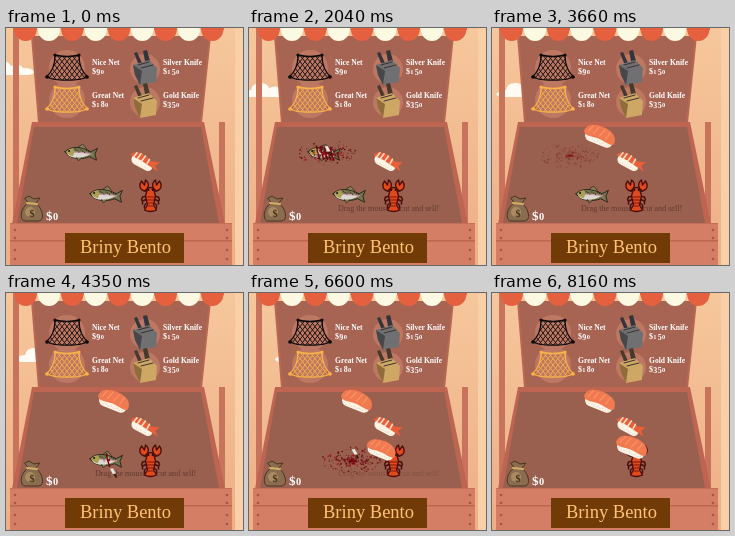
Recreate the animation shown at these times as an HTML page with a canvas. Size 237 by 237 pixels, loop 8220 ms.

```html
<!DOCTYPE html>
<html lang="en">
<head>
<meta charset="utf-8">
<title>Sushi stall</title>
<style>
html, body { margin: 0; width: 100%; height: 100%; overflow: hidden; background: #f3bd94; }
canvas { display: block; width: 237px; height: 237px; }
</style>
</head>
<body>
<canvas></canvas>
<script>
const LOOP = 8220, SIZE = 237;
const SERIF = '"Liberation Serif", serif';
const canvas = document.querySelector('canvas');
const g = canvas.getContext('2d');
const ratio = window.devicePixelRatio || 1;
canvas.width = canvas.height = SIZE * ratio;

const clamp = v => Math.max(0, Math.min(1, v));
const ramp = (t, a, b) => clamp((t - a) / (b - a));
const easeOut = p => 1 - (1 - p) ** 3;
const mix = (a, b, p) => a + (b - a) * p;

function seeded(seed) {
  return () => (seed = (seed * 16807) % 2147483647) / 2147483647;
}

function rect(color, x, y, w, h) {
  g.fillStyle = color;
  g.fillRect(x, y, w, h);
}

function poly(color, ...p) {
  g.fillStyle = color;
  g.beginPath();
  for (let i = 0; i < p.length; i += 2) g.lineTo(p[i], p[i + 1]);
  g.closePath();
  g.fill();
}

function oval(color, x, y, rx, ry = rx) {
  g.fillStyle = color;
  g.beginPath();
  g.ellipse(x, y, rx, ry, 0, 0, 7);
  g.fill();
}

function path(d, fill, stroke, width = 1) {
  const shape = new Path2D(d);
  if (fill) { g.fillStyle = fill; g.fill(shape); }
  if (stroke) { g.strokeStyle = stroke; g.lineWidth = width; g.stroke(shape); }
}

function text(s, x, y, size, color, weight = 'bold', align = 'left') {
  g.font = `${weight} ${size}px ${SERIF}`;
  g.textAlign = align;
  g.fillStyle = color;
  g.fillText(s, x, y);
}

// Old-style figures: 0 and 1 are short, 3, 5 and 9 hang below the line.
function price(s, x, y, size) {
  for (const c of s) {
    const short = '01'.includes(c), hangs = '359'.includes(c);
    text(c, x, y + (hangs ? size * .18 : 0), short ? size * .8 : size, '#fff');
    x += size * .54;
  }
}

function at(x, y, turn, draw, scale = 1) {
  g.save();
  g.translate(x, y);
  g.rotate(turn);
  g.scale(scale, scale);
  draw();
  g.restore();
}

function cloud(color) {
  path('M0 11Q4 7 10 7Q11 0 19 0Q26 0 28 5Q36 1 40 7Q50 7 51 11Q50 14 45 14H6Q1 14 0 11Z', color);
}

function sky(t) {
  const fade = g.createLinearGradient(0, 0, 0, SIZE);
  fade.addColorStop(0, '#f6c79c');
  fade.addColorStop(1, '#eeae86');
  rect(fade, 0, 0, SIZE, SIZE);
  rect('#f8cfa6', 229, 0, 8, SIZE);
  const s = t / 1000;
  at(-23 + 7.4 * s, mix(33, 55, ramp(t, 0, 2040)), 0, () => cloud('#fffaf2'));
}

function stall() {
  rect('#c8745c', 7, 0, 6, 195);
  rect('#c8745c', 213, 94, 6, 101);
  poly('#b76853', 25, 8, 205, 8, 196, 95, 32, 95);
  poly('#a86452', 27, 8, 203, 8, 194, 94, 34, 94);
  for (let i = 0; i < 9; i++) {
    const w = 210 / 9, x = 8 + i * w;
    rect(i % 2 ? '#fbf9e2' : '#e4603f', x, 0, w, 2);
    g.beginPath();
    g.ellipse(x + w / 2, 1, w / 2 - .5, 12, 0, 0, Math.PI);
    g.fill();
  }
  poly('#bd6551', 26, 94, 198, 94, 219, 196, 6, 196);
  poly('#99604f', 28, 99, 195, 99, 213, 195, 11, 195);
  rect('#d47e65', 4, 195, 222, 42);
  rect('#c46f58', 4, 195, 222, 1);
  rect('#bd6650', 4, 212, 222, 1.5);
  for (const y of [202, 210, 222, 231]) {
    oval('#a95742', 9, y, 1.3);
    oval('#a95742', 221, y, 1.3);
  }
  rect('#713b08', 59, 205, 119, 30);
  text('Briny Bento', 119.5, 224.5, 18.5, '#ffc373', 'normal', 'center');
}

function net(color) {
  const outline = 'M-12-13Q0-10 12-13Q12 2 21 9Q11 13 0 12Q-11 13-21 9Q-12 2-12-13Z';
  oval('#bd7863', 0, 0, 18);
  g.save();
  g.clip(new Path2D(outline));
  g.strokeStyle = color;
  g.lineWidth = .9;
  g.beginPath();
  for (let x = -40; x <= 40; x += 5) {
    for (const lean of [-11, 11]) {
      g.moveTo(x - lean, -14);
      g.lineTo(x + lean, 14);
    }
  }
  g.stroke();
  g.restore();
  path(outline, null, color, 1.3);
  for (const side of [-1, 1]) {
    oval(color, side * 12, -13, 1.6);
    oval(color, side * 20, 9, 1.8);
  }
}

function knifeBlock(body, side, handle) {
  oval('#bd7863', 0, 2, 15);
  path('M-7-4L-11-14L-8-15L-3-4M0-6L-2-16L2-17L5-6', handle);
  poly(body, -12, -2, 4, -7, 12, 1, 11, 15, -5, 18, -10, 8);
  poly(side, -12, -2, -3, 4, -5, 18, -10, 8);
  path('M-7-2L4-5M-4 1L8-2', null, '#3b332f', 1);
}

function shop() {
  at(61, 40, 0, () => net('#0e0a0a'));
  at(61, 72, 0, () => net('#f8b24a'));
  at(139, 39, 0, () => knifeBlock('#707073', '#47474b', '#34353a'));
  at(139, 72, 0, () => knifeBlock('#cfa765', '#8f6c3a', '#463a2c'));
  const items = [['Nice Net', '$90', 86, 37], ['Great Net', '$180', 86, 70],
    ['Silver Knife', '$150', 157, 37], ['Gold Knife', '$350', 157, 70]];
  for (const [name, cost, x, y] of items) {
    text(name, x, y, 7.6, '#fff');
    price(cost, x, y + 9, 8);
  }
}

function purse() {
  path('M-4-6C-13 0-12 12-7 12H7C13 11 11 0 4-6L8-11L2-10L-3-13L-7-11Z', '#8a6c4e', '#493522');
  path('M-5-6L5-5', null, '#d4ae68', 2);
  oval('#a98a62', -2, 3, 5, 5);
  text('$', 0, 8, 10, '#443019', 'bold', 'center');
  price('$0', 14, 11, 13);
}

function fish(cuts) {
  path('M-16 0C-12-6 0-7 10-2L16-6L14 0L16 6L9 3C1 7-12 7-16 0Z', '#75744c', '#25231c', .9);
  path('M-14 1Q-2-1 10 0Q2 6-7 5Q-13 4-14 1Z', '#dcd7d0');
  path('M-8 0Q0-1 10 0', null, '#c99aa2', 1.6);
  path('M-3-6L1-9L5-5M-4 5L-2 8L1 5', '#8a8057', '#25231c', .7);
  path('M-15 0Q-12-4-8-4Q-6 0-8 4Q-13 3-15 0Z', '#aaa052');
  for (let i = 0; i < 9; i++) oval('#2c2b20', -6 + i * 1.9, -3 + (i % 3), .6);
  oval('#111', -12, -1, 1);
  for (let i = 0; i < cuts; i++) {
    const x = [2, -6, 8, -2, 5][i];
    path(`M${x - 2}-6L${x + 2} 6`, null, '#6d0d12', 1.8);
    path(`M${x}-3L${x + 2} 3`, null, '#e8cdb2', .8);
  }
}

function rice() {
  path('M-15 0Q-16 9-9 10H10Q17 9 15 0Z', '#fff4e5');
  for (let i = 0; i < 9; i++) oval('#e6d7c8', -12 + i * 3, 7 + (i % 2), 1, .6);
}

function salmon() {
  rice();
  path('M-17 2C-17-6-9-9 0-9C11-9 18-4 17 4Q15 6 9 5Q0 3-9 5Q-16 6-17 2Z', '#f27a50');
  path('M-10-6L-13 1M-4-7L-7 1M3-7L0 1M9-6L7 2', null, '#f8966c', 1.1);
}

function shrimp() {
  at(-1, 0, 0, rice, .75);
  path('M-15 1C-13-7-2-7 7-3L15-6L12-1L17 3L7 2Q-4 0-15 1Z', '#ea5f38');
  path('M-10-4L-11 1M-6-5L-7 1M-1-5L-2 1M4-4L4 1', null, '#ffe2ca', 1.6);
}

function lobster() {
  const shell = '#e04a1c', dark = '#4a0d0b';
  for (const side of [-1, 1]) {
    g.save();
    g.scale(side, 1);
    path('M3 0L8 1L9 4M3 3L8 5L8 8M2 6L6 9L6 12M3-4L7-6', null, dark, 1.5);
    path('M6-5C1-8 1-13 5-16L6-11L9-15C12-11 11-6 6-5Z', shell, dark, 1.3);
    g.restore();
  }
  path('M-3-7Q0-10 3-7L5 0L3 9L6 14Q0 17-6 14L-3 9L-5 0Z', shell, dark, 1.3);
  path('M-4 1H4M-3 4H3M-3 7H3M-2 10H2', null, '#7d1711', 1.2);
  oval('#111', -2, -6, .9);
  oval('#111', 2, -6, .9);
}

function blood(t, x, y, start, stop, gone, seed) {
  const rnd = seeded(seed);
  const fade = 1 - ramp(t, stop, gone);
  for (let i = 0; i < 260; i++) {
    const born = mix(start, stop - 250, rnd());
    const angle = rnd() * 7, reach = rnd() ** 1.3 * 30, r = .3 + rnd() * .7;
    if (t < born || !fade) continue;
    const out = easeOut(ramp(t, born, born + 700));
    g.globalAlpha = fade * .9;
    oval(i % 3 ? '#650a10' : '#9c1018',
      x + Math.cos(angle) * reach * out,
      y + Math.sin(angle) * reach * .45 * out + 4 * ramp(t, stop, gone), r);
  }
  g.globalAlpha = 1;
}

function blade(t, x, y, start, stop) {
  if (t < start || t > stop) return;
  const p = (t - start) / 420;
  at(x + 8 * Math.sin(p * 2.3), y + 12 * Math.sin(p * Math.PI), -.5, () => {
    poly('#e9e5df', -1, -4, 2, -3, 2, 3, -1, 2);
    rect('#33221c', -.5, 3, 2, 4);
  });
}

// A fish is cut five times, then turns into sushi that slides to its plate.
function prepare(t, f) {
  const cuts = f.cuts.filter(c => t >= c).length;
  const slide = easeOut(ramp(t, f.done, f.done + 350));
  if (t < f.done) at(f.x, f.y, .08, () => fish(cuts));
  blood(t, f.x + 3, f.y, f.cuts[0], f.done, f.gone, f.seed);
  blade(t, f.x, f.y, f.cuts[0] - 120, f.done + 520);
  return () => {
    if (t >= f.done) at(mix(f.x, f.toX, slide), mix(f.y, f.toY, slide), .38, salmon, mix(.6, .96, slide));
  };
}

const catches = [
  { x: 75, y: 125, toX: 108, toY: 107, cuts: [520, 900, 1290, 1650, 1950], done: 2480, gone: 4200, seed: 71 },
  { x: 100, y: 167, toX: 140, toY: 153, cuts: [4290, 4700, 5050, 5400, 5760], done: 6450, gone: 8130, seed: 193 }
];

function frame(now) {
  const t = now % LOOP;
  g.setTransform(ratio, 0, 0, ratio, 0, 0);
  g.lineJoin = g.lineCap = 'round';
  sky(t);
  stall();
  shop();
  at(26, 181, 0, purse);
  g.globalAlpha = .65 * ramp(t, 30, 800) * (1 - ramp(t, 6100, 6900));
  text('Drag the mouse to cut and sell!', 89, 183, 8.1, '#42271f', 'normal');
  g.globalAlpha = 1;
  at(144.5, 168, 0, lobster);
  at(138, 133, .48, shrimp);
  const plates = catches.map(f => prepare(t, f));
  plates.forEach(draw => draw());
  requestAnimationFrame(frame);
}
requestAnimationFrame(frame);
</script>
</body>
</html>
```
